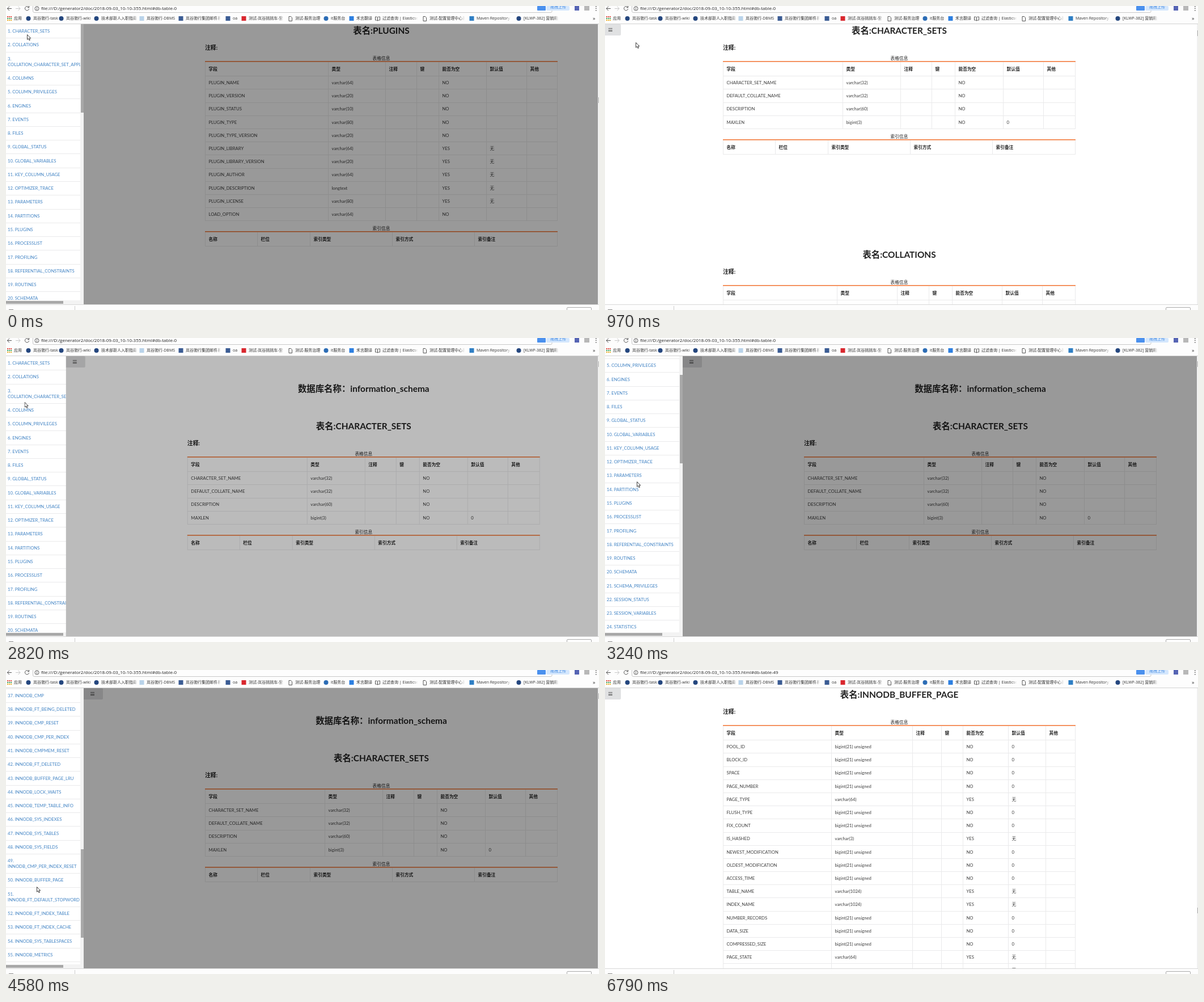
These frames come from a looping animation (1046x536 px, 8590 ms). An HTML page:

```html
<!DOCTYPE html>
<html lang="zh-CN">
<head>
<meta charset="utf-8">
<title>Database document</title>
<style>
html, body { margin: 0; width: 100%; height: 100%; overflow: hidden; background: #fff; }
body { position: relative; font: 7.7px Lato, "Noto Sans CJK SC", "Noto Sans CJK", sans-serif; color: rgba(0,0,0,.87); }
div, svg { position: absolute; }
.full { inset: 0; }
.t { line-height: 0; white-space: nowrap; }
.mid { width: 600px; margin-left: -300px; text-align: center; }
.h1 { font-size: 15.4px; font-weight: 700; }
.h3 { font-size: 9.86px; font-weight: 700; }
.th { font-weight: 700; }
.td { color: rgba(0,0,0,.76); }
.ln { background: #eaeaeb; }
.top { background: linear-gradient(#f27a3c 50%, #f8ae88 50%); }
#stage { width: 1046px; height: 536px; overflow: hidden; }
#view { clip-path: inset(32px 2px 10px 0); }
#side { left: 0; top: 32px; width: 137px; height: 494px; background: #f3f3f3; }
#clip { left: 0; top: 0; width: 131px; height: 487px; overflow: hidden; background: #fff; }
#list { left: 0; top: 0; color: #4183c4; }
.on { color: #1452a0; }
.thumb { background: #a8a8a8; }
#push { left: -6px; top: 0; width: 1100px; height: 536px; background: #fff; }
#page { left: 6px; top: 0; }
#menu { left: 0; top: 32px; width: 34px; height: 20px; background: #e0e1e2; border-radius: 0 2px 2px 0; }
#menu i { position: absolute; left: 11.5px; width: 7px; height: 1px; background: #555; }
#dim { background: rgba(0,0,0,.4); }
#bar { left: 0; top: 0; width: 1046px; height: 31px; background: #fdfdfd; border-bottom: 1px solid #d2d2d2;
  font-family: "Open Sans", "Noto Sans CJK SC", "Noto Sans CJK", sans-serif; color: #333; }
#url { left: 62px; top: 4px; font-size: 8px; color: #222; }
.mark { top: 15px; height: 14px; line-height: 14px; font-size: 7px; white-space: nowrap; overflow: hidden; }
#foot { left: 0; top: 526px; width: 1046px; height: 10px; background: #fdfdfd; box-shadow: inset 0 1px #d8d8d8; }
#cursor { left: -.6px; top: -.6px; }
</style>
</head>
<body>
<div id="stage">
  <div id="view" class="full">
    <div id="side">
      <div id="clip"><div id="list"></div></div>
      <div id="vbar" class="thumb" style="left:132px;top:0;width:5px;height:156px"></div>
      <div class="thumb" style="left:0;top:488px;width:101px;height:5px"></div>
    </div>
    <div id="push">
      <div id="page"></div>
      <div id="menu"><i style="top:7px"></i><i style="top:9.5px"></i><i style="top:12px"></i></div>
      <div id="dim" class="full"></div>
    </div>
  </div>
  <div style="left:1044px;top:32px;width:2px;height:494px;background:#f0f0f0"></div>
  <div id="pbar" class="thumb" style="left:1045px;top:0;width:1px;height:10px"></div>
  <div id="bar">
    <svg id="icons" width="1046" height="31" fill="none" stroke="#555"></svg>
    <div id="url" class="t"></div>
    <div id="marks"></div>
  </div>
  <div id="foot">
    <div style="left:5px;top:9px;width:8px;height:1px;background:#888"></div>
    <div style="left:121px;top:3px;width:1px;height:7px;background:#ccc"></div>
    <div style="left:989px;top:5px;width:42px;height:9px;border:1px solid #aaa;border-radius:2px;background:#fff"></div>
  </div>
  <svg id="cursor" width="14" height="16" fill="#fff" stroke="#111" stroke-width=".8" stroke-linejoin="round"><path id="shape"/></svg>
</div>
<script>
const $ = id => document.getElementById(id);
const text = (x, y, s, cls = '') => `<div class="t ${cls}" style="left:${x}px;top:${y}px">${s}</div>`;
const box = (x, y, w, h, cls = 'ln') =>
  `<div class="${cls}" style="left:${x}px;top:${y}px;width:${w}px;height:${h}px"></div>`;

// ---- document pages
const LEFT = 208, WIDE = 622, ROW = 23.19;
const FIELDS = '字段 类型 注释 键 能否为空 默认值 其他'.split(' ');
const KEYS = '名称 栏位 索引类型 索引方式 索引备注'.split(' ');

function table(y, caption, heads, cols, rows) {
  const end = y + 26.2 + ROW * rows.length, xs = [LEFT, ...cols];
  let out = text(519, y - 5.3, caption, 'mid');
  for (const x of [...xs, LEFT + WIDE - 1]) out += box(x, y, 1, end - y);
  for (let i = 0; i <= rows.length; i++) out += box(LEFT, Math.round(y + 25.7 + ROW * i), WIDE, 1);
  out += box(LEFT, Math.round(y - .5), WIDE, 2, 'top');
  heads.forEach((h, i) => out += text(xs[i] + 6.5, y + 13.5, h, 'th'));
  rows.forEach((row, r) => {
    const [name, type, nul, def = ''] = row.split('|');
    [name, type, , , nul, def].forEach((s, i) => {
      if (s) out += text(xs[i] + 6.5, y + 37.6 + ROW * r, s, 'td');
    });
  });
  return out;
}

function section(name, y, cols, rows) {
  const end = y + 80.7 + ROW * rows.length;
  return text(519, y, '表名:' + name, 'mid h1') + text(LEFT, y + 29.5, '注释:', 'h3') +
    table(y + 54.5, '表格信息', FIELDS, cols, rows) +
    table(end + 19, '索引信息', KEYS, [300, 393, 538, 683], []);
}

const big = names => names.split(' ').map(n => n + '|bigint(21) unsigned|NO|0');
const pages = {
  plugins: section('PLUGINS', 43, [425, 526, 581, 620, 704, 775], [
    'PLUGIN_NAME|varchar(64)|NO', 'PLUGIN_VERSION|varchar(20)|NO', 'PLUGIN_STATUS|varchar(10)|NO',
    'PLUGIN_TYPE|varchar(80)|NO', 'PLUGIN_TYPE_VERSION|varchar(20)|NO', 'PLUGIN_LIBRARY|varchar(64)|YES|无',
    'PLUGIN_LIBRARY_VERSION|varchar(20)|YES|无', 'PLUGIN_AUTHOR|varchar(64)|YES|无',
    'PLUGIN_DESCRIPTION|longtext|YES|无', 'PLUGIN_LICENSE|varchar(80)|YES|无', 'LOAD_OPTION|varchar(64)|NO']),
  first: text(519, 89, '数据库名称：information_schema', 'mid h1') +
    section('CHARACTER_SETS', 155, [419, 521, 576, 617, 702, 773], [
      'CHARACTER_SET_NAME|varchar(32)|NO', 'DEFAULT_COLLATE_NAME|varchar(32)|NO',
      'DESCRIPTION|varchar(60)|NO', 'MAXLEN|bigint(3)|NO|0']) +
    section('COLLATIONS', 550, [409, 515, 571, 612, 700, 771], ['COLLATION_NAME|varchar(32)|NO']),
  buffer: section('INNODB_BUFFER_PAGE', 43, [399, 542, 593, 631, 711, 777], [
    ...big('POOL_ID BLOCK_ID SPACE PAGE_NUMBER'), 'PAGE_TYPE|varchar(64)|YES|无',
    ...big('FLUSH_TYPE FIX_COUNT'), 'IS_HASHED|varchar(3)|YES|无',
    ...big('NEWEST_MODIFICATION OLDEST_MODIFICATION ACCESS_TIME'),
    'TABLE_NAME|varchar(1024)|YES|无', 'INDEX_NAME|varchar(1024)|YES|无',
    ...big('NUMBER_RECORDS DATA_SIZE COMPRESSED_SIZE'), 'PAGE_STATE|varchar(64)|YES|无', 'IO_FIX|varchar(64)|YES|无'])
};
for (const key in pages) $('page').innerHTML += `<div id="${key}">${pages[key]}</div>`;

// ---- side list
const tables = ('CHARACTER_SETS COLLATIONS COLLATION_CHARACTER_SET_APPLICABILITY COLUMNS COLUMN_PRIVILEGES ENGINES ' +
  'EVENTS FILES GLOBAL_STATUS GLOBAL_VARIABLES KEY_COLUMN_USAGE OPTIMIZER_TRACE PARAMETERS PARTITIONS PLUGINS ' +
  'PROCESSLIST PROFILING REFERENTIAL_CONSTRAINTS ROUTINES SCHEMATA SCHEMA_PRIVILEGES SESSION_STATUS ' +
  'SESSION_VARIABLES STATISTICS TABLES TABLESPACES TABLE_CONSTRAINTS TABLE_PRIVILEGES TRIGGERS USER_PRIVILEGES VIEWS').split(' ');
tables.push(...('LOCKS TRX SYS_DATAFILES FT_CONFIG SYS_VIRTUAL CMP FT_BEING_DELETED CMP_RESET CMP_PER_INDEX ' +
  'CMPMEM_RESET FT_DELETED BUFFER_PAGE_LRU LOCK_WAITS TEMP_TABLE_INFO SYS_INDEXES SYS_TABLES SYS_FIELDS ' +
  'CMP_PER_INDEX_RESET BUFFER_PAGE FT_DEFAULT_STOPWORD FT_INDEX_TABLE FT_INDEX_CACHE SYS_TABLESPACES METRICS ' +
  'SYS_FOREIGN CMPMEM BUFFER_POOL_STATS SYS_COLUMNS SYS_FOREIGN_COLS SYS_TABLESTATS').split(' ').map(n => 'INNODB_' + n));
let listHtml = '', itemY = 0;
tables.forEach((name, i) => {
  const n = i + 1, wraps = [3, 49, 51].includes(n);
  listHtml += wraps ? text(3, itemY + 12.2, n + '.') + text(3, itemY + 22.3, name)
                    : text(3, itemY + 12.2, n + '. ' + name, 'item' + n);
  itemY += wraps ? 34.3 : 24.27;
  listHtml += box(0, itemY, 131, 1);
});
$('list').innerHTML = listHtml;
const picked = document.querySelector('.item50');

// ---- browser bar: icon kind, colour, label x, label width, label
const marks = `grid||14|20|应用
dot|#24467e|48|45|岚谷驰行-task
dot|#24467e|106|46|岚谷驰行-wiki
dot|#24467e|168|64|技术部新人入职指南
box|#b9d3ea|248|52|岚谷驰行-DBMS
box|#3b5c94|317|62|岚谷驰行集团邮件系统
box|#3b5c94|400|12|oa
box|#d9272e|428|62|测试-岚谷挑挑车-登录
doc||510|46|测试-服务治理
dot|#2b6cb5|573|28|it服务台
box|#2d7fe0|618|30|禾言翻译
book||664|62|过滤查询 | Elasticsearch
doc||747|62|测试-配置管理中心系统
box|#2f7fc4|830|60|Maven Repository: Search
dot|#24467e|913|62|[KLWP-382] 营销用户`;
const draw = {
  dot: (x, c) => `<circle cx="${x}" cy="22" r="4" fill="${c}" stroke="none"/>`,
  box: (x, c) => `<rect x="${x - 4}" y="18" width="8" height="8" fill="${c}" stroke="none"/>`,
  doc: x => `<path d="M${x - 2.5} 18.5h3.5l2 2v6h-5.5z"/>`,
  book: x => `<path d="M${x} 20c-1-1-3-1-4-1v6c1 0 3 0 4 1 1-1 3-1 4-1v-6c-1 0-3 0-4 1v6"/>`,
  grid: () => Array.from({ length: 9 }, (_, i) =>
    `<rect x="${2 + i % 3 * 3}" y="${18 + (i / 3 | 0) * 3}" width="2" height="2" stroke="none" fill="${['#e0483e', '#44a05a', '#e9ae2a'][i / 3 | 0]}"/>`).join('')
};
let iconHtml = '<path d="M2 4.5h8M6 .8 2.3 4.5 6 8.2M40 2.2A3.6 3.6 0 1 0 40.6 5M40.7 0v2.8h-2.8"/>' +
  '<path stroke="#c8c8c8" d="M17 4.5h8M21.5 .8 25 4.5 21.5 8.2M47.5 0v9q0 2.5 2.5 2.5h911q2 0 2-2V0"/>' +
  '<circle cx="54.5" cy="4.5" r="3.5"/><path d="M54.5 4v2.5M54.5 2.2v1"/>' +
  '<g stroke="none"><rect x="937" width="15" height="8" rx="1" fill="#4a90ee"/><rect x="953" width="41" height="8" rx="2" fill="#d4e7fd"/>' +
  '<rect x="1003" width="8" height="8" fill="#5664b4"/><rect x="1020" width="9" height="8" fill="#b8b8b8"/>' +
  '<path fill="#555" d="M1040 0h1.5v1.5h-1.5zM1040 3.5h1.5v1.5h-1.5zM1040 7h1.5v1.5h-1.5z"/></g>';
let markHtml = '<div class="mark" style="left:960px;top:-5px;color:#3c86e0">拖拽上传</div>' +
  '<div class="mark" style="left:1035px;font-size:9px">»</div>';
for (const line of marks.split('\n')) {
  const [kind, color, x, w] = line.split('|'), label = line.split('|').slice(4).join('|');
  iconHtml += draw[kind](x - 8.5, color);
  const fade = w > 59 ? `;-webkit-mask-image:linear-gradient(90deg,#000 ${w - 8}px,transparent ${w}px)` : '';
  markHtml += `<div class="mark" style="left:${x}px;width:${w}px${fade}">${label}</div>`;
}
$('icons').innerHTML = iconHtml;
$('marks').innerHTML = markHtml;

// ---- timeline
const LOOP = 8590, OPEN = 143;
const STEPS = [0, 120, 240, 390, 550, 690, 970, 1100, 1220, 1360, 1480, 1630, 1780, 1930, 2050, 2170, 2310, 2430, 2550,
  2700, 2820, 2940, 3090, 3240, 3360, 3510, 3660, 3790, 3940, 4060, 4190, 4310, 4460, 4580, 4730, 4850,
  5260, 5380, 5530, 5650, 5800, 5950, 6670, 6790];
const POINTER = [[0, 38, 51], [690, 38, 51], [970, 55, 65], [1100, 60, 75], [1220, 27, 56], [1360, 20, 54],
  [1480, 31, 59], [1630, 36, 66], [1780, 37, 50], [1930, 20, 44], [2170, 6, 40], [2310, 5, 41], [2550, 22, 49],
  [2700, 24, 60], [3090, 55, 235], [3240, 57, 254], [4310, 50, 391], [4580, 55, 383], [4850, 57, 366],
  [5380, 57, 366], [5530, 80, 355], [5800, 178, 312], [5950, 207, 301], [6670, 670, 430]];
const PAGE_SCROLL = [[1630, 112], [1780, 60], [1930, 12], [2050, 0]];
const LIST_SCROLL = [[3090, 0], [3240, 103], [4310, 883]];
const SHAPES = {
  arrow: 'M.5 .5V9.2L2.5 7.4 4 10.6 5.4 10 4 6.9H6.7Z',
  hand: 'M3 7V1.5Q3 .5 3.9 .5T4.8 1.5V5Q6 4.3 6.5 5.3 7.5 4.9 7.9 5.8 9 5.5 9 7V9.5L8 12.5H3.8L.6 8.2Q.5 6.6 1.8 7.2L3 8.4Z',
  beam: 'M.5 .5H2Q2.5 .5 2.5 1 2.5 .5 3 .5H4.5M2.5 1V9.5M.5 10H4.5'
};

const clamp = v => Math.max(0, Math.min(1, v));

// CSS "ease": cubic-bezier(.25, .1, .25, 1)
function ease(p) {
  p = clamp(p);
  const bez = (a, b, u) => 3 * a * u * (1 - u) ** 2 + 3 * b * u * u * (1 - u) + u ** 3;
  let lo = 0, hi = 1;
  for (let i = 0; i < 24; i++) {
    const u = (lo + hi) / 2;
    if (bez(.25, .25, u) < p) lo = u; else hi = u;
  }
  return p === 0 ? 0 : p === 1 ? 1 : bez(.1, 1, lo);
}

function track(points, t) {
  const i = points.findIndex(p => p[0] > t);
  if (i === 0) return points[0].slice(1);
  if (i < 0) return points[points.length - 1].slice(1);
  const a = points[i - 1], b = points[i], k = (t - a[0]) / (b[0] - a[0]);
  return a.slice(1).map((v, n) => v + (b[n + 1] - v) * k);
}

function render(t) {
  const page = t < 120 ? 'plugins' : t < 5260 ? 'first' : 'buffer';
  const shift = OPEN * (t < 120 ? 1 : t < 2700 ? 1 - ease((t - 90) / 500)
    : t < 5260 ? ease((t - 2580) / 500) : 1 - ease((t - 5280) / 500));
  const [scroll] = track(PAGE_SCROLL, t), [listScroll] = track(LIST_SCROLL, t);
  const atTop = t >= 1930 && t < 5260;

  for (const key in pages) $(key).style.display = key === page ? '' : 'none';
  $('first').style.top = -scroll + 'px';
  $('push').style.transform = shift ? `translateX(${shift}px)` : '';
  $('dim').style.opacity = t < 120 ? 1 : t < 2700 || t >= 5260 ? 0 : clamp((t - 2580) / 360);
  $('menu').style.display = atTop || shift === 0 ? '' : 'none';
  $('menu').style.background = t >= 1930 && t < 2700 ? '#bcbdbe' : '';
  $('list').style.top = -listScroll + 'px';
  $('vbar').style.top = listScroll * .322 + 'px';
  $('pbar').style.top = (page === 'plugins' ? 161 : page === 'buffer' ? 419 : 41 + scroll / 56) + 'px';
  $('url').textContent = 'file:///D:/generator2/doc/2018-09-03_10-10-355.html#db-table-' + (t < 5260 ? 0 : 49);
  picked.classList.toggle('on', t >= 4730);

  const [x, y] = track(POINTER, t);
  const kind = t >= 1930 && t < 2700 ? 'hand' : t >= 4730 && t < 5530 ? 'beam' : 'arrow';
  $('shape').setAttribute('d', SHAPES[kind]);
  $('cursor').style.transform = `translate(${x}px,${y}px)`;
  $('cursor').style.display = t < 6790 ? '' : 'none';
}

const start = performance.now();
let shown = -1;
function tick() {
  const t = (performance.now() - start) % LOOP;
  const step = STEPS.filter(s => s <= t).pop();
  if (step !== shown) render(shown = step);
  requestAnimationFrame(tick);
}
tick();
</script>
</body>
</html>
```
